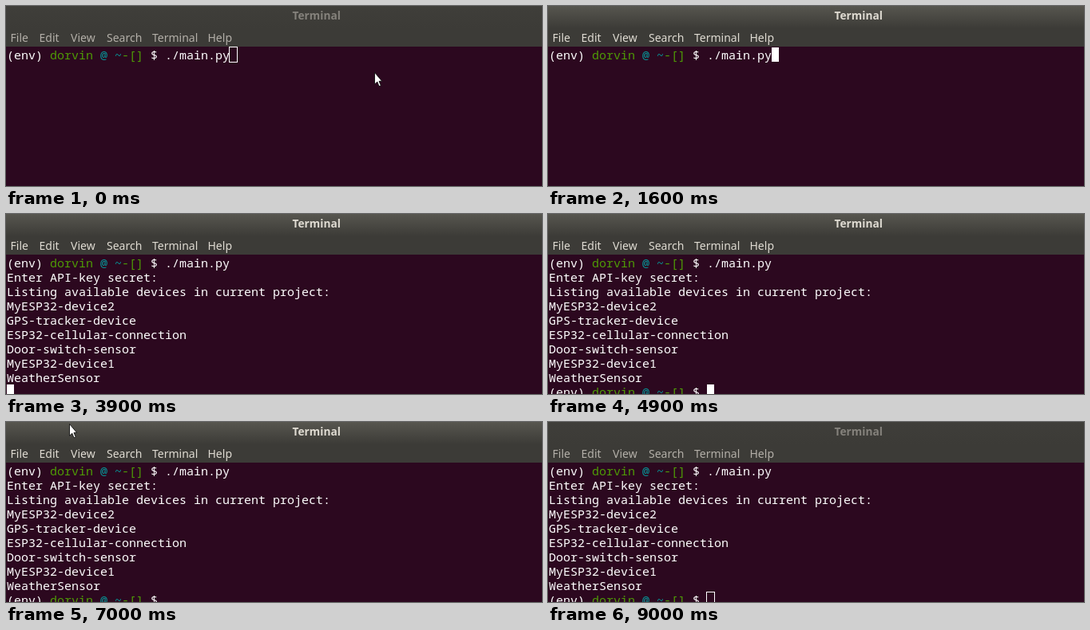
Write an HTML page that moves like this. It is 671 by 226 pixels and loops after 9100 ms.

```html
<!DOCTYPE html>
<html lang="en">
<head>
<meta charset="utf-8">
<title>Terminal</title>
<style>
  html, body { margin: 0; width: 100%; height: 100%; overflow: hidden; background: #2c081f; }
  svg { display: block; width: 671px; height: 226px; }
  text { white-space: pre; }
  .bar { font: 14px "Noto Sans", "Open Sans", sans-serif; fill: #dfdbd2; }
  .bar .title { font-size: 13.7px; font-weight: 700; }
  .bar.idle { fill: #b3afa8; }
  .bar.idle .title { fill: #85827c; }
  .bar.idle .glow { opacity: .12; }
  .term { font: 15px "Noto Sans Mono", "DejaVu Sans Mono", monospace; fill: #fff; }
  .green { fill: #4e9a06; }
  .cyan { fill: #06989a; }
</style>
</head>
<body>
<svg viewBox="0 0 671 226">
  <defs>
    <linearGradient id="sheen" x2="0" y2="1">
      <stop offset="0" stop-color="#57564f"/>
      <stop offset="1" stop-color="#3c3b37"/>
    </linearGradient>
  </defs>
  <rect width="671" height="226" fill="#2c081f"/>
  <g id="bar" class="bar">
    <rect width="671" height="51" fill="#3c3b37"/>
    <rect class="glow" width="671" height="28" fill="url(#sheen)"/>
    <text class="title" x="358.5" y="17">Terminal</text>
    <text x="5.5" y="45">File</text>
    <text x="41.5" y="45">Edit</text>
    <text x="81" y="45">View</text>
    <text x="126" y="45">Search</text>
    <text x="183" y="45">Terminal</text>
    <text x="252.5" y="45">Help</text>
  </g>
  <g id="term" class="term"></g>
  <rect id="cursor"/>
  <path id="arrow" d="M.5 .5V15.2L3.8 12.2L6 17.8L8.3 16.8L6 11.4H9.7Z" fill="#fff" stroke="#111" stroke-width=".9"/>
  <g id="beam" fill="none" stroke-linecap="square">
    <path d="M1.5 1.5H3.5L4.5 2.5L5.5 1.5H7.5M4.5 2.5V14.5M1.5 15.5H3.5L4.5 14.5L5.5 15.5H7.5" stroke="#fff" stroke-width="2.6"/>
    <path d="M1.5 1.5H3.5L4.5 2.5L5.5 1.5H7.5M4.5 2.5V14.5M1.5 15.5H3.5L4.5 14.5L5.5 15.5H7.5" stroke="#111"/>
  </g>
</svg>
<script>
const LOOP = 9100;
const CELL = 9, LINE = 18, LEFT = 1, TOP = 52, BASELINE = 15;
const byId = id => document.getElementById(id);
const [bar, term, cursor, arrow, beam] = ['bar', 'term', 'cursor', 'arrow', 'beam'].map(byId);

const PROMPT = [['(env) '], ['dorvin ', 'green'], ['@ ~', 'cyan'], ['-[]', 'green'], [' $ ']];
const plain = text => [[text]];

// [time shown, coloured runs]
const ROWS = [
  [0, [...PROMPT, ['./main.py']]],
  [2000, plain('Enter API-key secret:')],
  ...['Listing available devices in current project:', 'MyESP32-device2',
    'GPS-tracker-device', 'ESP32-cellular-connection', 'Door-switch-sensor',
    'MyESP32-device1', 'WeatherSensor'].map(text => [3900, plain(text)]),
  [4000, PROMPT]
];

// [time, column, row]
const CURSOR_CELL = [[0, 31, 0], [1700, 0, 1], [2000, 21, 1], [3900, 0, 9], [4000, 22, 9]];

// [time, look]
const CURSOR_LOOK = [
  [0, 'hollow'], [400, 'solid'], [900, 'off'], [1600, 'solid'],
  [2200, 'off'], [2800, 'solid'], [3600, 'off'], [3700, 'solid'],
  [4300, 'off'], [4900, 'solid'], [6000, 'off'], [6100, 'solid'],
  [6700, 'off'], [7300, 'solid'], [7900, 'off'], [9000, 'hollow']
];

// [time, shape, x, y]
const POINTER = [
  [0, arrow, 461, 83], [500, arrow, 460, 75], [700, beam, 460, 75], [1600, null],
  [6300, beam, 460, 75], [6400, beam, 352, 54], [6500, arrow, 242, 13],
  [6600, arrow, 190, 10], [6700, arrow, 148, 8], [6800, arrow, 116, 6],
  [6900, arrow, 94, 4], [7000, arrow, 79, 2], [7100, arrow, 69, 0], [7400, null]
];

const at = (track, t) => track.findLast(step => step[0] <= t);

function svg(name, attrs, parent) {
  const el = document.createElementNS('http://www.w3.org/2000/svg', name);
  for (const key in attrs) el.setAttribute(key, attrs[key]);
  return parent.appendChild(el);
}

const lines = ROWS.map(([shown, runs], row) => {
  const el = svg('text', { x: LEFT, y: TOP + row * LINE + BASELINE }, term);
  for (const [text, color = ''] of runs) svg('tspan', { class: color }, el).textContent = text;
  return { el, shown };
});

function show(el, visible) {
  el.style.visibility = visible ? 'visible' : 'hidden';
}

function drawCursor(t) {
  const [, col, row] = at(CURSOR_CELL, t);
  const look = at(CURSOR_LOOK, t)[1];
  const hollow = look === 'hollow';
  const inset = hollow ? 0.5 : 0;
  const box = {
    x: LEFT + col * CELL - inset, y: TOP + row * LINE - inset,
    width: CELL + 2 * inset, height: LINE + 2 * inset,
    fill: hollow ? 'none' : '#fff', stroke: hollow ? '#fff' : 'none'
  };
  for (const key in box) cursor.setAttribute(key, box[key]);
  show(cursor, look !== 'off');
}

function drawPointer(t) {
  const [, shape, x, y] = at(POINTER, t);
  for (const el of [arrow, beam]) show(el, el === shape);
  if (shape) shape.setAttribute('transform', `translate(${x} ${y})`);
}

function draw(t) {
  bar.classList.toggle('idle', t < 400 || t >= 9000);
  for (const { el, shown } of lines) show(el, t >= shown);
  drawCursor(t);
  drawPointer(t);
}

const start = performance.now();
function tick() {
  draw((performance.now() - start) % LOOP);
  requestAnimationFrame(tick);
}
tick();
</script>
</body>
</html>
```
